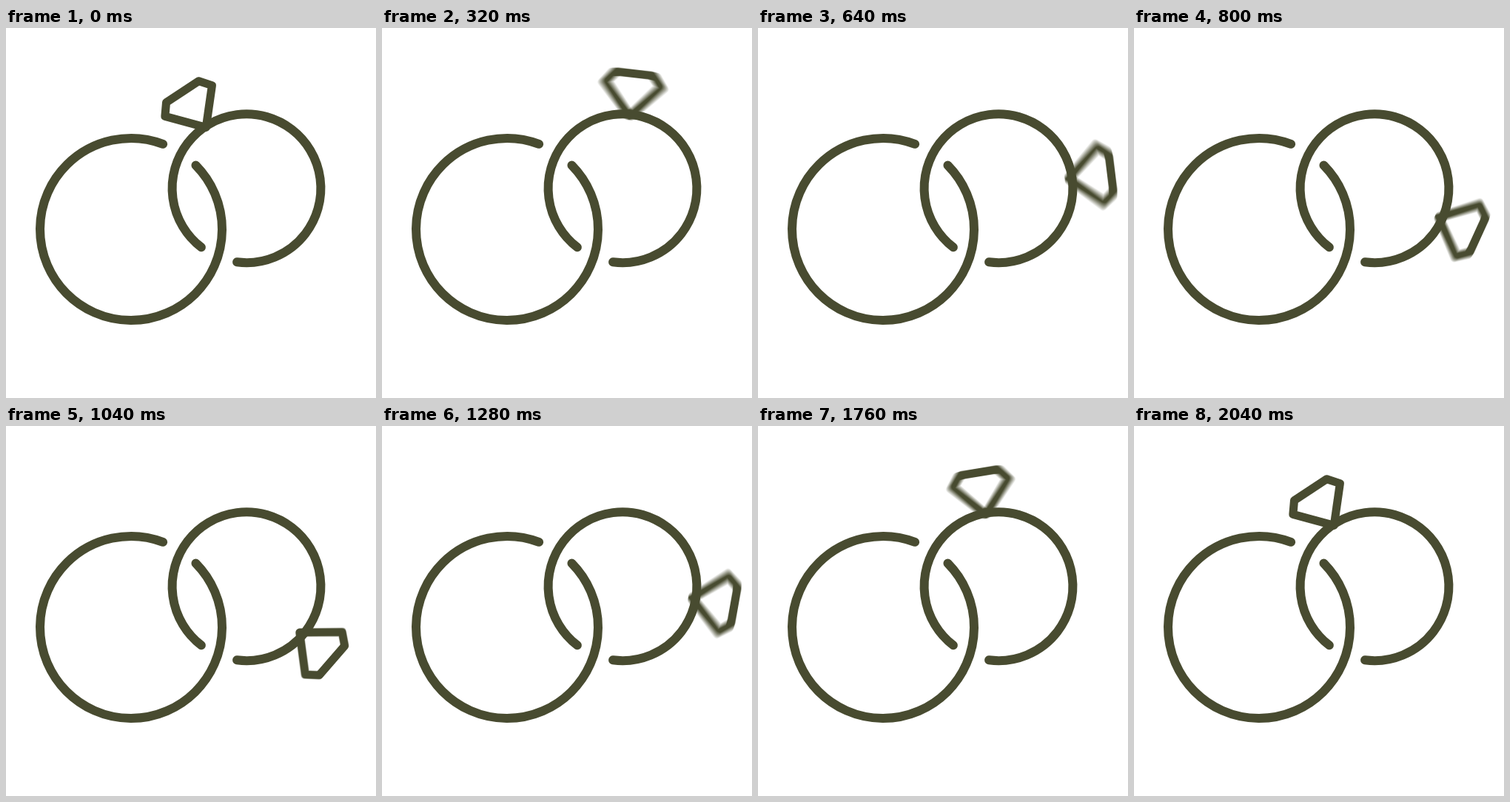
These frames come from a looping animation (500x500 px, 3040 ms). An HTML page with a canvas:

```html
<!DOCTYPE html>
<html lang="en">
<head>
<meta charset="utf-8">
<title>Rings</title>
<style>
  html, body { margin: 0; width: 100%; height: 100%; overflow: hidden; background: #fff; }
  canvas { display: block; width: 500px; height: 500px; }
</style>
</head>
<body>
<canvas id="stage" width="500" height="500"></canvas>
<script>
const ctx = document.getElementById('stage').getContext('2d');
const COLOR = '#484b30';
const LOOP = 3040, STEP = 40, SWING = 1000;
const REST = -33.3, ARC = 165;
const SHUTTER = 20, SAMPLES = 15;
const PIVOT = [323.5, 215.5];
const rad = deg => deg * Math.PI / 180;

const gem = new Path2D('M0 -97 L-38 -140 L-26.3 -154.8 L26.3 -154.8 L38 -140 Z');

// Swings out and back, each way with a smooth start and stop.
function gemAngle(time) {
  const p = Math.max(0, 1 - Math.abs(time - SWING) / SWING);
  return REST + ARC * p * p * (3 - 2 * p);
}

function drawRing(x, y, radius, from, to) {
  ctx.beginPath();
  ctx.arc(x, y, radius, rad(from), rad(to));
  ctx.stroke();
}

// Averages several poses within the shutter time for motion blur.
function drawGem(time) {
  ctx.globalCompositeOperation = 'lighter';
  ctx.globalAlpha = 1 / SAMPLES;
  ctx.strokeStyle = '#000';
  ctx.lineWidth = 11;
  for (let i = 0; i < SAMPLES; i++) {
    const offset = SHUTTER * ((i + 0.5) / SAMPLES - 0.5);
    ctx.save();
    ctx.translate(...PIVOT);
    ctx.rotate(rad(gemAngle(time + offset)));
    ctx.stroke(gem);
    ctx.restore();
  }
  ctx.globalAlpha = 1;
  ctx.globalCompositeOperation = 'source-in';
  ctx.fillStyle = COLOR;
  ctx.fillRect(0, 0, 500, 500);
  ctx.globalCompositeOperation = 'source-over';
}

function frame(now) {
  const time = Math.floor((now % LOOP) / STEP) * STEP;
  ctx.clearRect(0, 0, 500, 500);
  ctx.lineCap = ctx.lineJoin = 'round';
  drawGem(Math.min(time, 2 * SWING + STEP));
  ctx.strokeStyle = COLOR;
  ctx.lineWidth = 12;
  drawRing(169, 272, 123, -44.7, 290.5);
  drawRing(325, 216.7, 100.4, 127.5, 457.4);
  requestAnimationFrame(frame);
}
frame(performance.now());
</script>
</body>
</html>
```
